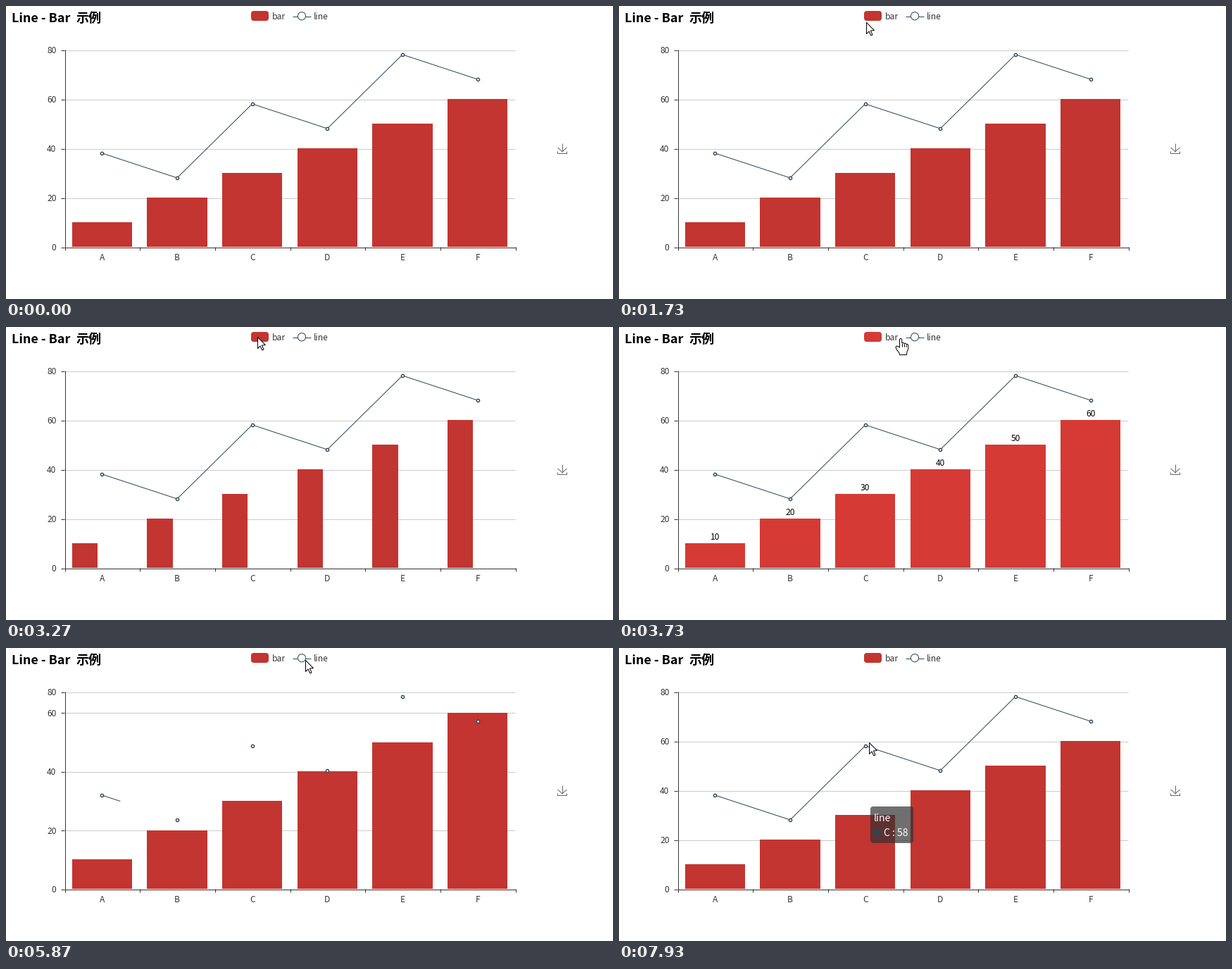
A matplotlib script that plays this animation: 862 by 416 pixels, repeating every 8000 ms.

```python
import numpy as np
import matplotlib.pyplot as plt
from matplotlib.animation import FuncAnimation
from matplotlib.collections import LineCollection
from matplotlib.patches import Circle, FancyBboxPatch, Polygon, Rectangle

W, H, DPI = 862, 416, 64  # a power of two keeps the pixel size exact
LOOP, INTERVAL = 8000, 40
PX = 72 / DPI  # one pixel in points
RED, RED_LIT = "#c23531", "#d53a35"
NAVY, INK, GRAY, GRAY_LIT = "#2f4554", "#333333", "#cccccc", "#e0e0e0"

LEFT, RIGHT, TOP, BASE = 83, 723, 62, 342
BAND = (RIGHT - LEFT) / 6
BAR_W = BAND * 0.8
NAMES = "ABCDEF"
BARS = np.arange(10, 61, 10)
LINE = np.array([38, 28, 58, 48, 78, 68])
BAR_X = LEFT + BAND * (np.arange(6) + 0.1)
MID_X = LEFT + BAND * (np.arange(6) + 0.5)
LINE_Y = BASE - LINE * (BASE - TOP) / 80

# moments of the pointer's actions, in ms
BAR_OFF, BAR_ON, LINE_OFF, LINE_ON = 2200, 3200, 4330, 5800

# pointer stops: time, x, y
STOPS = np.array([
    (1733, 351, 23), (1800, 355, 18), (1867, 357, 14), (3467, 357, 14),
    (3733, 400, 16), (4000, 428, 16), (5133, 428, 16), (5200, 429, 20),
    (5333, 436, 28), (5400, 436, 28), (5533, 425, 17), (7133, 425, 17),
    (7866, 352, 137), (7933, 355, 134),
])
ARROW = np.array([(.5, .5), (.5, 16.5), (4, 13), (6.8, 18.9), (9, 17.9),
                  (6.4, 12), (11.4, 11.6)])
HAND = np.array([
    (-1.5, 13), (-1.5, 1.5), (-.5, .5), (.7, .5), (1.7, 1.5), (1.7, 6.5),
    (4, 6.3), (5, 7.5), (7, 7.2), (8, 8.5), (9.8, 8.5), (10.8, 10),
    (10.8, 15), (9, 19), (8.5, 23.5), (-1.5, 23.5), (-2, 21), (-6, 15.5),
    (-7, 12.5), (-6, 11), (-4, 11.5),
])
KNUCKLES = np.array([[(1.7, 6.5), (1.7, 11.5)], [(5, 7.5), (5, 11.5)],
                     [(8, 8.5), (8, 11.5)]])

plt.rcParams["font.family"] = "Noto Sans CJK JP"
fig = plt.figure(figsize=(W / DPI, H / DPI), dpi=DPI, facecolor="white")
ax = fig.add_axes([0, 0, 1, 1])
ax.set_xlim(0, W)
ax.set_ylim(H, 0)
ax.axis("off")


def label(x, y, s="", size=12, color=INK, ha="left", z=6, **kw):
    return ax.text(x, y, s, fontsize=size * PX, color=color, ha=ha,
                   va="baseline", zorder=z, **kw)


def strokes(segs, color, z):
    return ax.add_collection(
        LineCollection(segs, colors=color, linewidths=PX, zorder=z))


def rounded(x, y, w, h, color, z, **kw):
    return ax.add_patch(FancyBboxPatch(
        (x, y), w, h, boxstyle="round,pad=0,rounding_size=4",
        fc=color, ec="none", zorder=z, **kw))


def crisp(v):
    return np.floor(v + 0.01) + 0.5


# title and save icon
label(8, 23, "Line - Bar", 18, "black", weight="bold")
label(100, 23, "示例", 18, "black", weight="bold")
icon = [[(4.6, 22.9), (29.2, 45.3), (54.7, 23.4)],
        [(4.6, 43.6), (4.6, 56), (53.8, 56), (53.8, 43.6)],
        [(29.2, 45), (29.2, 0)]]
strokes([np.array(s) * 15 / 58 + (782.3, 195) for s in icon], "#666666", 3)

# axes
ticks = crisp(LEFT + BAND * np.arange(7))
strokes([[(LEFT + .5, TOP), (LEFT + .5, BASE + 1)],
         [(LEFT, BASE + .5), (RIGHT + 1, BASE + .5)]]
        + [[(x, BASE), (x, BASE + 5)] for x in ticks], INK, 3)
grid = strokes([], GRAY, 1)
y_ticks = strokes([], INK, 3)
y_labels = {v: label(71.5, 0, str(v), ha="right")
            for v in (0, 10, 20, 30, 40, 50, 60, 80)}
for x, s in zip(MID_X, NAMES):
    label(x, 361, s, ha="center")

# series
bars = [ax.add_patch(Rectangle((x, BASE), 0, 0, fc=RED, ec="none", zorder=2))
        for x in BAR_X]
bar_labels = [label(x, 0, str(v), color="black", ha="center")
              for x, v in zip(MID_X, BARS)]
curve, = ax.plot([], [], color=NAVY, lw=PX, zorder=4)
dots, = ax.plot(MID_X, LINE_Y, "o", ms=4.2 * PX, mfc="white", mec=NAVY,
                mew=1.4 * PX, zorder=5)
line_labels = [label(x, y - 10, str(v), color="black", ha="center")
               for x, y, v in zip(MID_X, LINE_Y, LINE)]

# legend
bar_key = rounded(348, 7, 25, 14, RED, 7)
bar_name = label(378, 19, "bar", z=7)
line_key = strokes([[(407, 14.5), (433, 14.5)]], NAVY, 7)
ring = ax.add_patch(Circle((420, 14.2), 5.6, fc="white", ec=NAVY, lw=PX,
                           zorder=8))
line_name = label(437, 19, "line", z=7)

# tooltip
tip_box = rounded(0, 0, 61, 52, "#323232", 9, alpha=0.7)
tip_dot = ax.add_patch(Circle((0, 0), 5, fc=NAVY, ec="none", zorder=10))
tip_head = label(0, 0, "", 14, "white", z=10)
tip_text = label(0, 0, "", 14, "white", z=10)

# pointer
pointer = ax.add_patch(Polygon(ARROW, fc="white", ec="black", lw=PX,
                               joinstyle="round", zorder=12))
knuckles = strokes([], "black", 13)


def ease(t, start, length=300):
    p = np.clip((t - start - 16) / length, 0, 1)
    return 1 - (1 - p) ** 3


def pointer_at(t):
    if t < 1730:
        u = (t - 933) / 800
        a, b, c = np.array([(642, 409), (230, 330), (351, 23)])
        pos = (1 - u) ** 2 * a + 2 * u * (1 - u) * b + u ** 2 * c
    else:
        pos = np.array([np.interp(t, STOPS[:, 0], STOPS[:, i])
                        for i in (1, 2)])
    return np.round(pos)


def hovered_bar(t):
    """Index of the bar below the pointer on its way up, or -1."""
    if not 930 <= t < 1730:
        return -1
    x, y = pointer_at(t)
    for i in range(6):
        if 0 <= x - BAR_X[i] <= BAR_W and BASE - 3.5 * BARS[i] <= y <= BASE:
            return i
    return -1


def draw_axis(t, scale):
    narrow = LINE_OFF <= t < LINE_ON
    rows = []
    for v, text in y_labels.items():
        if v in (20, 40, 60):
            y = BASE - v * scale
        else:
            y = BASE - v * 280 / (60 if v % 20 else 80)
        shown = narrow if v in (10, 30, 50) else not (v == 80 and narrow)
        text.set_visible(shown)
        text.set_y(y + 5)
        if shown:
            rows.append(crisp(y))
    grid.set_segments([[(LEFT, y), (RIGHT, y)] for y in rows if y < BASE])
    y_ticks.set_segments([[(LEFT - 5, y), (LEFT, y)] for y in rows])


def draw_bars(t, scale, lit):
    width = BAR_W * (1 - ease(t, BAR_OFF, 250) + ease(t, BAR_ON))
    over = hovered_bar(t)
    for i, (bar, text) in enumerate(zip(bars, bar_labels)):
        height = BARS[i] * scale
        on = lit or i == over
        bar.set_bounds(BAR_X[i], BASE - height, width, height)
        bar.set_facecolor(RED_LIT if on else RED)
        text.set_y(BASE - height - 5)
        text.set_visible(on)


def draw_line(t):
    shown = not LINE_OFF <= t < LINE_ON
    reveal = 162 + 0.538 * (t - 5867) if t >= LINE_ON else RIGHT
    end = min(reveal, MID_X[-1])
    xs = np.append(MID_X[MID_X < end], end)
    curve.set_data(xs, np.interp(xs, MID_X, LINE_Y))
    curve.set_visible(shown and end > MID_X[0])
    dots.set_visible(shown)
    for i, text in enumerate(line_labels):
        text.set_visible(4060 <= t < LINE_OFF
                         or (i == 2 and 7860 <= t < 7920))


def draw_legend(t, lit):
    off = BAR_OFF <= t < BAR_ON
    bar_key.set_facecolor(GRAY if off else RED_LIT if lit else RED)
    bar_name.set_color(GRAY if off else INK)
    off = LINE_OFF <= t < LINE_ON
    over = 5200 <= t < 5300 or 5460 <= t < LINE_ON
    shade = GRAY_LIT if over else GRAY
    line_key.set_color(GRAY if off else NAVY)
    ring.set_edgecolor(shade if off else NAVY)
    line_name.set_color(shade if off else INK)


def draw_tooltip(t):
    i = max(hovered_bar(t), hovered_bar(t - 67))
    if t >= 7920:
        x, y, rows, color = 357, 225, ("line", "C : 58"), NAVY
    elif i >= 0:
        x, y = pointer_at(t - 67) + 20
        rows, color = ("bar", f"{NAMES[i]} : {BARS[i]}"), RED
    else:
        rows = None
    for part in (tip_box, tip_dot, tip_head, tip_text):
        part.set_visible(rows is not None)
    if rows:
        tip_box.set_x(x)
        tip_box.set_y(y)
        tip_dot.set_center((x + 10, y + 37))
        tip_dot.set_facecolor(color)
        tip_head.set_position((x + 5, y + 21))
        tip_text.set_position((x + 19, y + 42))
        tip_head.set_text(rows[0])
        tip_text.set_text(rows[1])


def draw_pointer(t):
    pos = pointer_at(t)
    hand = (hovered_bar(t) >= 0 or 1800 <= t < BAR_ON or 3520 <= t < 5300
            or 5460 <= t < LINE_ON or 7860 <= t < 7920)
    pointer.set_visible(t >= 930)
    pointer.set_xy((HAND if hand else ARROW) + pos)
    knuckles.set_segments(KNUCKLES + pos if hand else [])


def draw(frame):
    # the picture advances fifteen times a second
    t = int((frame * INTERVAL + 30) * 15 / 1000) * 1000 / 15
    narrow = ease(t, LINE_OFF) - ease(t, LINE_ON)
    scale = 280 * ((1 - narrow) / 80 + narrow / 60)
    lit = 1800 <= t < BAR_OFF or 3520 <= t < 3800
    draw_axis(t, scale)
    draw_bars(t, scale, lit)
    draw_line(t)
    draw_legend(t, lit)
    draw_tooltip(t)
    draw_pointer(t)
    return []


anim = FuncAnimation(fig, draw, frames=LOOP // INTERVAL, interval=INTERVAL,
                     repeat=True, blit=False)
plt.show()
```
